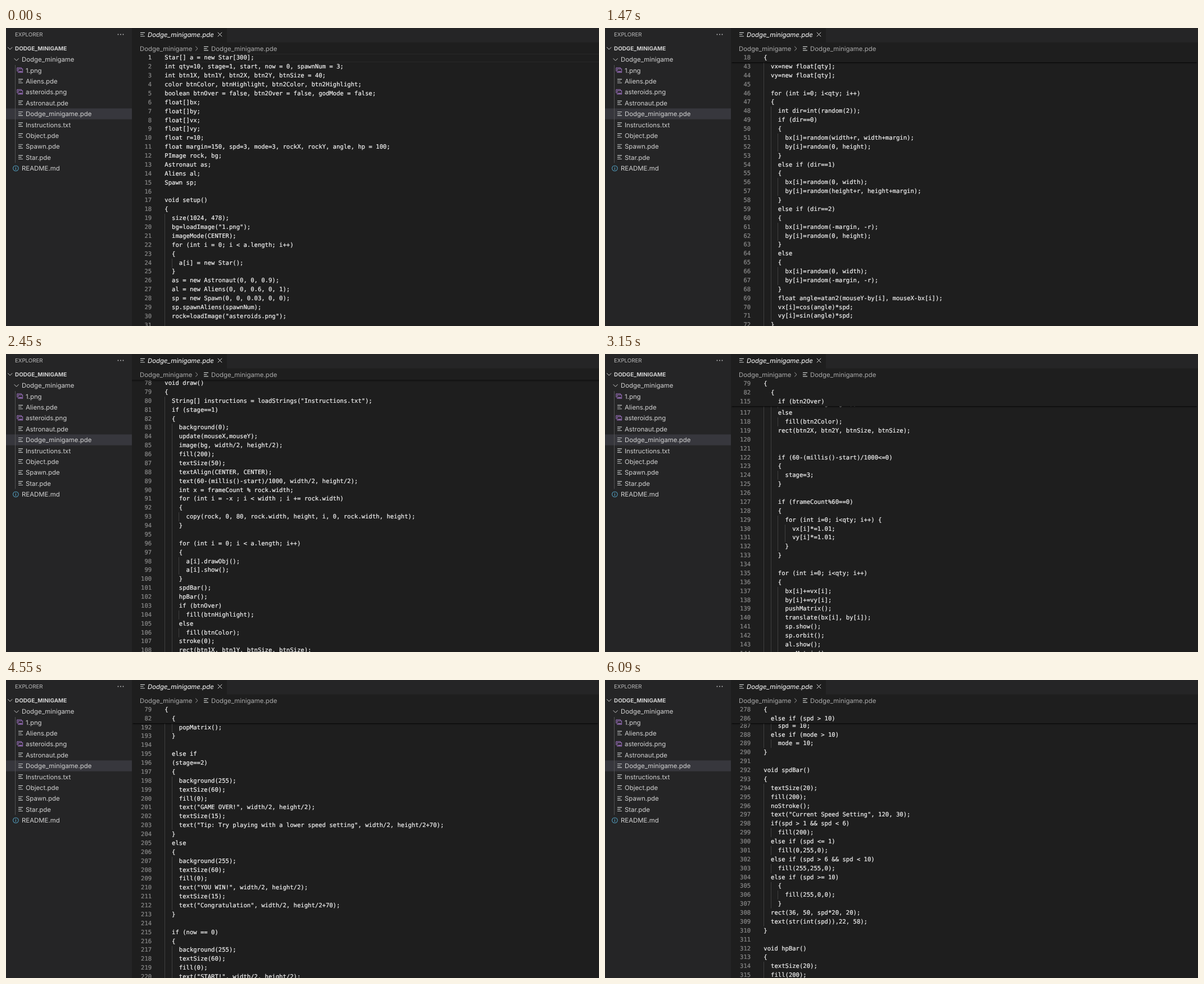
Write an HTML page that moves like this. It is 1055x531 px and loops after 7140 ms.

```html
<!DOCTYPE html>
<html lang="en">
<head>
<meta charset="utf-8">
<title>Code scroll</title>
<style>
html, body { margin: 0; width: 100%; height: 100%; overflow: hidden; background: #1e1e1e; }
body { position: relative; text-rendering: geometricPrecision; }
#chrome { position: absolute; left: 0; top: 0; font: 11.4px Inter, "Open Sans", sans-serif; fill: #d2d2d2; }
#chrome text { white-space: pre; }
.line { fill: none; stroke: #ccc; stroke-width: 1; }
#editor { position: absolute; left: 224px; top: 45.6px; width: 831px; height: 485.4px; overflow: hidden;
  font: 10.58px/15.875px "DejaVu Sans Mono", monospace; color: #f2f2f2; -webkit-text-stroke: .22px; }
#code, #sticky { position: absolute; left: 0; top: 0; width: 100%; }
.row { position: relative; height: 15.875px; white-space: pre; }
.row b, .row i, .row span { position: absolute; top: 0; height: 100%; }
.row b, .row span { top: .9px; }
.row b { left: 0; width: 35.2px; text-align: right; font-weight: normal; color: #8a8a8a; }
.row i { left: 58.3px; background: repeating-linear-gradient(90deg, #404040 0 1px, transparent 1px 12.74px); }
.row span { left: 58.3px; }
#code .row:first-child b { color: #c6c6c6; }
#code .row:first-child::before { content: ""; position: absolute; left: 58px; right: 0; top: 0; bottom: 0;
  box-sizing: border-box; border: 1.8px solid #282828; border-right: 0; }
#shade { position: absolute; left: 0; top: 0; width: 100%; height: 4px; box-shadow: inset 0 4px 4px -4px #000; }
#sticky { background: #1e1e1e; }
#sticky .row { position: absolute; left: 0; width: 100%; background: #1e1e1e; }
</style>
</head>
<body>
<svg id="chrome" width="1055" height="531" viewBox="0 0 1055 531">
  <defs>
    <path id="file" d="M0-3.2h8M0 0h5.6M0 3.2h8" fill="none" stroke="#c8cbca" stroke-width="1.15"/>
    <g id="image" fill="none" stroke="#a074c4">
      <path d="M.8 2.2V-4.2H8.6V-2.6"/>
      <rect x="2.8" y="-2.2" width="7.8" height="6.2"/>
      <path d="M3.6 3.4 5.6 1 7 2.4 8.4.8 10 3.4z" fill="#a074c4" stroke="none"/>
    </g>
  </defs>
  <rect width="224" height="531" fill="#252526"/>
  <rect x="393" width="662" height="25.6" fill="#252526"/>
  <rect y="143.3" width="224" height="19.4" fill="#37373d"/>
  <text x="16" y="14.6" font-size="9.7" fill="#bbb">EXPLORER</text>
  <g fill="#c5c5c5"><circle cx="199.5" cy="11.5" r=".9"/><circle cx="204" cy="11.5" r=".9"/><circle cx="208.5" cy="11.5" r=".9"/></g>
  <path class="line" d="M3.2 34.2 7.2 38.2 11.2 34.2M14.6 54.2 18.6 58.2 22.6 54.2"/>
  <text x="16" y="39.6" font-size="9.9" font-weight="700">DODGE_MINIGAME</text>
  <text x="28" y="60.1">Dodge_minigame</text>
  <path d="M16.5 66V240.3" stroke="#585858" stroke-width=".9"/>
  <g id="files"></g>
  <circle cx="17.4" cy="250" r="4.8" fill="none" stroke="#519aba" stroke-width="1.1"/>
  <path d="M17.4 247v1.3M17.4 249.2v3.6" stroke="#519aba" stroke-width="1.3"/>
  <text x="28" y="254.1">README.md</text>
  <use href="#file" x="239" y="11.5"/>
  <text x="252" y="15.7" font-style="italic" fill="#fff">Dodge_minigame.pde</text>
  <path class="line" d="M376.8 7.8 384.2 15.2M384.2 7.8 376.8 15.2" style="stroke:#e0e0e0"/>
  <g fill="#a9a9a9">
    <text x="238" y="40.7">Dodge_minigame</text>
    <path class="line" d="M337.2 32.8 341 36.6 337.2 40.4" style="stroke:#a9a9a9"/>
    <use href="#file" x="352" y="36.6"/>
    <text x="365" y="40.7">Dodge_minigame.pde</text>
  </g>
</svg>
<div id="editor">
  <div id="code"></div>
  <div id="shade"></div>
  <div id="sticky"></div>
</div>

<script type="text/plain" id="listing">
Star[] a = new Star[300];
int qty=10, stage=1, start, now = 0, spawnNum = 3;
int btn1X, btn1Y, btn2X, btn2Y, btnSize = 40;
color btnColor, btnHighlight, btn2Color, btn2Highlight;
boolean btnOver = false, btn2Over = false, godMode = false;
float[]bx;
float[]by;
float[]vx;
float[]vy;
float r=10;
float margin=150, spd=3, mode=3, rockX, rockY, angle, hp = 100;
PImage rock, bg;
Astronaut as;
Aliens al;
Spawn sp;

void setup()
{
  size(1024, 478);
  bg=loadImage("1.png");
  imageMode(CENTER);
  for (int i = 0; i < a.length; i++)
  {
    a[i] = new Star();
  }
  as = new Astronaut(0, 0, 0.9);
  al = new Aliens(0, 0, 0.6, 0, 1);
  sp = new Spawn(0, 0, 0.03, 0, 0);
  sp.spawnAliens(spawnNum);
  rock=loadImage("asteroids.png");

  btnColor = color(255);
  btnHighlight = color(200);
  btn2Color = color(255);
  btn2Highlight = color(200);
  btn1X = 30;
  btn1Y = 400;
  btn2X = 90;
  btn2Y = 400;

  bx=new float[qty];
  by=new float[qty];
  vx=new float[qty];
  vy=new float[qty];

  for (int i=0; i<qty; i++)
  {
    int dir=int(random(2));
    if (dir==0)
    {
      bx[i]=random(width+r, width+margin);
      by[i]=random(0, height);
    }
    else if (dir==1)
    {
      bx[i]=random(0, width);
      by[i]=random(height+r, height+margin);
    }
    else if (dir==2)
    {
      bx[i]=random(-margin, -r);
      by[i]=random(0, height);
    }
    else
    {
      bx[i]=random(0, width);
      by[i]=random(-margin, -r);
    }
    float angle=atan2(mouseY-by[i], mouseX-bx[i]);
    vx[i]=cos(angle)*spd;
    vy[i]=sin(angle)*spd;
  }

  noStroke();
  start=millis();
}

void draw()
{
  String[] instructions = loadStrings("Instructions.txt");
  if (stage==1)
  {
    background(0);
    update(mouseX,mouseY);
    image(bg, width/2, height/2);
    fill(200);
    textSize(50);
    textAlign(CENTER, CENTER);
    text(60-(millis()-start)/1000, width/2, height/2);
    int x = frameCount % rock.width;
    for (int i = -x ; i < width ; i += rock.width)
    {
      copy(rock, 0, 80, rock.width, height, i, 0, rock.width, height);
    }

    for (int i = 0; i < a.length; i++)
    {
      a[i].drawObj();
      a[i].show();
    }
    spdBar();
    hpBar();
    if (btnOver)
      fill(btnHighlight);
    else
      fill(btnColor);
    stroke(0);
    rect(btn1X, btn1Y, btnSize, btnSize);

    fill(200);
    textSize(15);
    text("God Mode: ON/OFF", btn1X+btnSize/2, btn1Y+btnSize);

    stroke(0);
    if (btn2Over)
      fill(btn2Highlight);
    else
      fill(btn2Color);
    rect(btn2X, btn2Y, btnSize, btnSize);


    if (60-(millis()-start)/1000<=0)
    {
      stage=3;
    }

    if (frameCount%60==0)
    {
      for (int i=0; i<qty; i++) {
        vx[i]*=1.01;
        vy[i]*=1.01;
      }
    }

    for (int i=0; i<qty; i++)
    {
      bx[i]+=vx[i];
      by[i]+=vy[i];
      pushMatrix();
      translate(bx[i], by[i]);
      sp.show();
      sp.orbit();
      al.show();
      popMatrix();
    }

    for (int i=0; i<qty; i++)
    {
      if (dist(mouseX, mouseY, bx[i], by[i])<r+20)
      {
        if (!godMode)
          hp-=1;
        pushMatrix();
        translate(bx[i], by[i]);
        al.orbit();
        popMatrix();
      }
      if (hp<=0)
      {
        stage=2;
      }
    }

    for (int i=0; i<qty; i++)
    {
      if (bx[i]<-margin || bx[i]>width+margin)
      {
        vx[i]=-vx[i];
        bx[i]+=vx[i];
      }
      if (by[i]<-margin || by[i]>height+margin)
      {
        vy[i]=-vy[i];
        by[i]+=vy[i];
      }
    }

    rockX=mouseX;
    rockY=mouseY;
    angle+=0.02;

    pushMatrix();
    translate(rockX, rockY);
    rotate(angle);
    as.show();
    popMatrix();

    pushMatrix();
    translate(width/2, height/2);
    rotate(-angle);
    sp.drawObj();
    popMatrix();
  }

  else if
  (stage==2)
  {
    background(255);
    textSize(60);
    fill(0);
    text("GAME OVER!", width/2, height/2);
    textSize(15);
    text("Tip: Try playing with a lower speed setting", width/2, height/2+70);
  }
  else
  {
    background(255);
    textSize(60);
    fill(0);
    text("YOU WIN!", width/2, height/2);
    textSize(15);
    text("Congratulation", width/2, height/2+70);
  }

  if (now == 0)
  {
    background(255);
    textSize(60);
    fill(0);
    text("START!", width/2, height/2);
    textSize(15);
    text("Click to play", width/2, height/2+70);
  }

  if (hp < 0)
    hp = 0;
}

void mousePressed()
{
  now = 1;
  if (stage != 1)
  {
    stage = 1;
    hp = 100;
    spd = 3;
    mode = 3;

    for (int i=0; i<qty; i++)
    {
      int dir=int(random(2));

      if (dir==0)
      {
        bx[i]=random(width+r, width+margin);
        by[i]=random(0, height);
      }
      else if (dir==1)
      {
        bx[i]=random(0, width);
        by[i]=random(height+r, height+margin);
      }
      else if (dir==2)
      {
        bx[i]=random(-margin, -r);
        by[i]=random(0, height);
      }
      else
      {
        bx[i]=random(0, width);
        by[i]=random(-margin, -r);
      }
      float angle=atan2(mouseY-by[i], mouseX-bx[i]);
      vx[i]=cos(angle)*spd;
      vy[i]=sin(angle)*spd;
    }
    start=millis();
  }

  if (btnOver)
    godMode = true;
  else if (btn2Over)
    godMode = false;

}

void mouseWheel(MouseEvent event)
{
  float e = event.getCount();
  spd += -e * 0.1;
  mode += -e *0.1;
  if (spd < 1)
    spd = 1;
  else if (mode < 1)
    mode = 1;
  else if (spd > 10)
    spd = 10;
  else if (mode > 10)
    mode = 10;
}

void spdBar()
{
  textSize(20);
  fill(200);
  noStroke();
  text("Current Speed Setting", 120, 30);
  if(spd > 1 && spd < 6)
    fill(200);
  else if (spd <= 1)
    fill(0,255,0);
  else if (spd > 6 && spd < 10)
    fill(255,255,0);
  else if (spd >= 10)
    {
      fill(255,0,0);
    }
  rect(36, 50, spd*20, 20);
  text(str(int(spd)),22, 58);
}

void hpBar()
{
  textSize(20);
  fill(200);
  noStroke();
</script>

<script>
const $ = id => document.getElementById(id);
const ROW = 15.875, INDENT = 12.74, TICK = 70, LOOP = 7140;

// Sidebar file list
$('files').innerHTML = ['1.png', 'Aliens.pde', 'asteroids.png', 'Astronaut.pde', 'Dodge_minigame.pde',
  'Instructions.txt', 'Object.pde', 'Spawn.pde', 'Star.pde'].map((name, i) => {
    const y = 75.5 + 19.4 * i, img = name.endsWith('.png');
    return `<use href="#${img ? 'image' : 'file'}" x="${img ? 19 : 22}" y="${y - .4}"/>
      <text x="35" y="${y + 4.1}">${name}</text>`;
  }).join('');

const lines = $('listing').textContent.slice(1).trimEnd().split('\n');
const indents = lines.map(s => s.trim() ? s.search(/\S/) / 2 : -1);

// Blank lines take their guides from the nearest lines around them
function guides(i) {
  let a = i, b = i;
  while (indents[a] < 0) a--;
  while (indents[b] < 0) b++;
  return Math.min(indents[a], indents[b]);
}

const escape = s => s.replace(/&/g, '&amp;').replace(/</g, '&lt;');
const row = (i, guide, style = '') => `<div class="row" style="${style}"><b>${i + 1}</b>` +
  `<i style="width:${Math.max(0, guide * INDENT - 4)}px"></i><span>${escape(lines[i])}</span></div>`;

$('code').innerHTML = lines.map((_, i) => row(i, guides(i))).join('');

// Indentation blocks: header line, last inner line, nesting depth
const blocks = [], open = [];
let last = -1;
indents.forEach((n, i) => {
  if (n < 0) return;
  if (last >= 0 && n > indents[last]) {
    const block = { start: last, end: last, depth: open.length };
    blocks.push(block);
    open.push(block);
  }
  while (open.length && indents[open[open.length - 1].start] >= n) open.pop();
  open.forEach(b => b.end = i);
  last = i;
});

function drawSticky(scroll) {
  let html = '', height = 0;
  for (let slot = 0; slot < 5; slot++) {
    const top = slot * ROW;
    const block = blocks.find(b => b.depth === slot &&
      b.start * ROW - scroll <= top && (b.end + 1) * ROW - scroll > top);
    if (!block || scroll <= 0) break;
    const push = Math.min(0, (block.end + 1) * ROW - scroll - top - ROW);
    html += row(block.start, 0, `top:${top + push}px;z-index:${9 - slot}`);
    height = top + push + ROW;
    if (push < 0) break;
  }
  $('sticky').innerHTML = html;
  $('sticky').style.height = height + 'px';
  $('sticky').style.boxShadow = height ? '0 2.8px 1.8px -1.8px #000' : 'none';
}

// Scroll position over time: [ms, px]
const path = [[560, 0], [770, 110], [980, 370], [1190, 562], [1330, 627], [1470, 651.3], [1540, 655],
  [1610, 655], [1820, 775], [1960, 858], [2030, 858], [2240, 1005], [2450, 1223.8], [2660, 1510],
  [2800, 1665], [2870, 1680], [2940, 1680], [3150, 1789.8], [3360, 1985], [3850, 2420], [4340, 2855],
  [4550, 3001], [4760, 3190], [5250, 3770], [5460, 3977.5], [5670, 4235], [5880, 4420], [6020, 4497], [6090, 4512]];
const rate = k => k < 0 || k >= path.length - 1 ? 0
  : (path[k + 1][1] - path[k][1]) / (path[k + 1][0] - path[k][0]);
const slope = k => {
  const a = rate(k - 1), b = rate(k);
  return a * b > 0 ? 2 * a * b / (a + b) : 0;
};

function scrollAt(t) {
  if (t < path[0][0]) return 0;
  const k = path.findIndex(p => p[0] > t) - 1;
  if (k < 0) return path[path.length - 1][1];
  const [t0, y0] = path[k], [t1, y1] = path[k + 1], d = t1 - t0, u = (t - t0) / d, v = 1 - u;
  return y0 * v * v * (1 + 2 * u) + y1 * u * u * (3 - 2 * u) + d * u * v * (v * slope(k) - u * slope(k + 1));
}

let shown = -1;
function tick() {
  const step = Math.floor(performance.now() % LOOP / TICK);
  if (step !== shown) {
    shown = step;
    const scroll = scrollAt(step * TICK);
    $('code').style.top = -scroll + 'px';
    $('shade').style.opacity = scroll > 0 ? 1 : 0;
    drawSticky(scroll);
  }
  requestAnimationFrame(tick);
}
tick();
</script>
</body>
</html>
```
